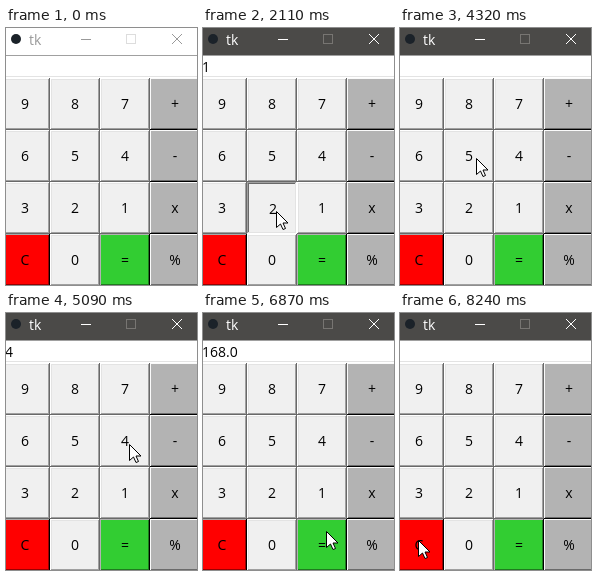
An HTML page with a canvas for the animation above (8510 ms loop, 191 by 257 pixels).

```html
<!DOCTYPE html>
<html lang="en">
<head>
<meta charset="utf-8">
<title>Calculator</title>
<style>
html, body { margin: 0; width: 100%; height: 100%; overflow: hidden; background: #fff; }
canvas { display: block; }
</style>
</head>
<body>
<canvas id="stage" width="191" height="257"></canvas>
<script>
const ctx = document.getElementById('stage').getContext('2d');
const LOOP = 8510, HOLD = 140;
const KEYS = '987+654-321xC0=%';
const KEY_W = 50, KEY_H = 52;
const ENTRANCE = { x: 159, y: 245 };

const tone = (bg, light, shade, soft = bg, dark = '#000') => ({ bg, light, shade, soft, dark });
const FACE = tone('#f0f0f0', '#fff', '#a0a0a0', '#e3e3e3', '#696969');
const GREY = tone('#b3b3b3', '#fafafa', '#6b6b6b');
const RED = tone('#f00', '#a9a9a9', '#900');
const GREEN = tone('#32cd32', '#b3b3b3', '#1e7b1e');

// The pointer travels to each key between two times, waits, then clicks.
// aim is the offset from the key's centre, bend the sideways bow of the path.
const visits = [
  { key: '1', from: 240, to: 940, wait: 550 },
  { key: '2', from: 1630, to: 1970 },
  { key: '3', from: 2240, to: 2530, aim: [-8, -6] },
  { key: '+', from: 2840, to: 3340, wait: 360, aim: [-1, -4], bend: 0.11 },
  { key: '5', from: 3900, to: 4320, aim: [7, 2], hover: true },
  { key: '4', from: 4470, to: 4750 },
  { key: '5', from: 5080, to: 5430 },
  { key: '=', from: 5710, to: 6140, wait: 260, aim: [4, -14], bend: 0.32 },
  { key: 'C', from: 7100, to: 7760, aim: [-1, -5], bend: -0.08 }
];

function keyCorner(i) {
  return [(i % 4) * KEY_W - 6, 50 + Math.floor(i / 4) * KEY_H];
}

let previous = ENTRANCE;
for (const v of visits) {
  const [x, y] = keyCorner(KEYS.indexOf(v.key));
  const [dx, dy] = v.aim || [4, 3];
  v.start = previous;
  v.end = previous = { x: x + KEY_W / 2 + dx, y: y + KEY_H / 2 + dy };
  v.press = v.to + (v.wait || HOLD);
}
const clicks = visits.filter(v => !v.hover);

function rect(x, y, w, h, color) {
  ctx.fillStyle = color;
  ctx.fillRect(x, y, w, h);
}

function text(str, x, y, color = '#000', align = 'left') {
  ctx.font = '14px "Open Sans", sans-serif';
  ctx.textAlign = align;
  ctx.fillStyle = color;
  ctx.fillText(str, x, y);
}

function bevel(x, y, w, h, topLeft, bottomRight) {
  rect(x, y, w, h, bottomRight);
  rect(x, y, w - 1, h - 1, topLeft);
}

function drawTitleBar(active) {
  const ink = active ? '#fff' : '#999';
  rect(0, 0, 191, 27, active ? '#4b4a48' : '#fff');
  ctx.fillStyle = '#1b2229';
  ctx.beginPath();
  ctx.arc(10, 11, 5, 0, Math.PI * 2);
  ctx.fill();
  text('tk', 23, 17, ink);
  rect(75, 11, 10, 1, ink);
  ctx.lineWidth = 1;
  ctx.strokeStyle = active ? '#777572' : '#ddd';
  ctx.strokeRect(120.5, 6.5, 9, 9);
  ctx.strokeStyle = ink;
  ctx.beginPath();
  ctx.moveTo(166, 6); ctx.lineTo(176, 16);
  ctx.moveTo(176, 6); ctx.lineTo(166, 16);
  ctx.stroke();
}

function drawEntry(value) {
  rect(0, 27, 191, 23, '#fff');
  rect(0, 27, 191, 1, '#a0a0a0');
  rect(0, 48, 191, 1, '#e3e3e3');
  text(value, -1, 44);
}

function drawKey(label, i, pressed) {
  const [x, y] = keyCorner(i);
  const style = pressed ? FACE
    : label === 'C' ? RED : label === '=' ? GREEN : i % 4 === 3 ? GREY : FACE;
  const { bg, light, soft, shade, dark } = style;
  const [outer, inner] = pressed ? [[shade, light], [dark, soft]] : [[light, dark], [soft, shade]];
  bevel(x, y, KEY_W, KEY_H, ...outer);
  bevel(x + 1, y + 1, KEY_W - 2, KEY_H - 2, ...inner);
  rect(x + 2, y + 2, KEY_W - 4, KEY_H - 4, bg);
  const shift = pressed ? 1 : 0;
  text(label, x + 25 + shift, y + 31 + shift, '#000', 'center');
}

function drawPointer({ x, y }) {
  const arrow = [[0, 0], [0, 16], [4, 12.5], [6.5, 18], [9, 17], [6.5, 11.5], [11.5, 11.5]];
  ctx.beginPath();
  arrow.forEach(([dx, dy]) => ctx.lineTo(x + dx + 0.5, y + dy + 0.5));
  ctx.closePath();
  ctx.fillStyle = '#fff';
  ctx.fill();
  ctx.strokeStyle = '#000';
  ctx.stroke();
}

function pointerAt(t) {
  const { from, to, start, end, bend = 0 } = visits.filter(v => t >= v.from).pop();
  const k = Math.min(1, (t - from) / (to - from));
  const u = k * k * (3 - 2 * k);
  const dx = end.x - start.x, dy = end.y - start.y;
  const bow = bend * 4 * u * (1 - u);
  return {
    x: Math.round(start.x + dx * u - dy * bow),
    y: Math.round(start.y + dy * u + dx * bow)
  };
}

// Works out the entry text from the keys released so far.
function entryAt(t) {
  let entry = '', sum = 0;
  for (const { key, press } of clicks) {
    if (t < press + HOLD) break;
    if (key === '+') { sum += Number(entry); entry = ''; }
    else if (key === '=') entry = (sum + Number(entry)).toFixed(1);
    else if (key === 'C') entry = '';
    else entry += key;
  }
  return entry;
}

function draw(t) {
  const down = clicks.find(c => t >= c.press && t < c.press + HOLD);
  drawTitleBar(t >= clicks[0].press);
  drawEntry(entryAt(t));
  [...KEYS].forEach((label, i) => drawKey(label, i, down && down.key === label));
  if (t >= visits[0].from) drawPointer(pointerAt(t));
}

const begin = performance.now();
function tick() {
  draw((performance.now() - begin) % LOOP);
  requestAnimationFrame(tick);
}
tick();
</script>
</body>
</html>
```
